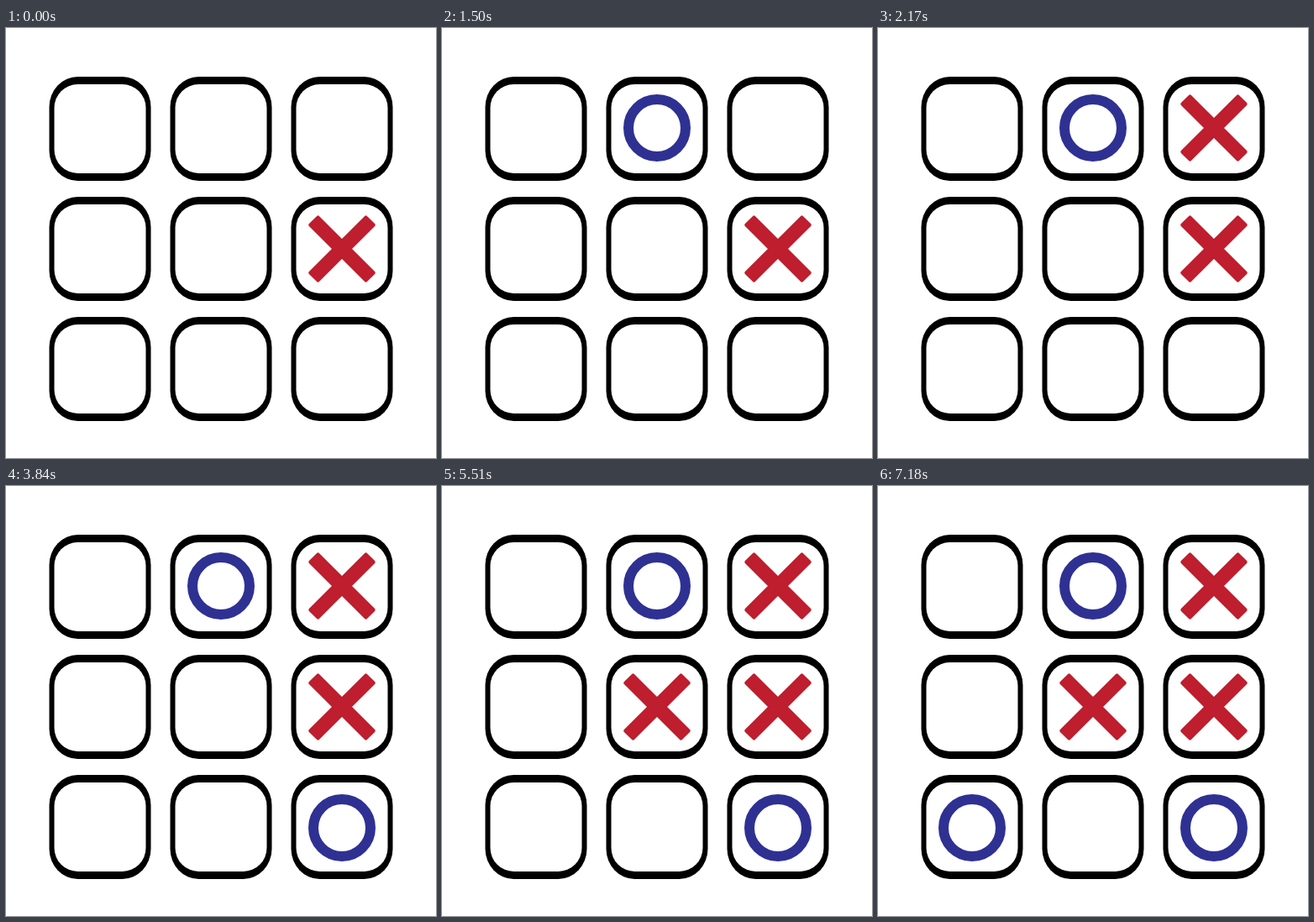
Write an HTML page that moves like this. It is 512 by 512 pixels and loops after 8 s.

```html
<!DOCTYPE html>
<html lang="en">
<head>
<meta charset="utf-8">
<title>Noughts and crosses</title>
<style>
  html, body { margin: 0; width: 100%; height: 100%; overflow: hidden; background: #fff; }
  svg { display: block; width: 100%; height: 100%; }
</style>
</head>
<body>
<svg viewBox="0 0 512 512">
  <defs>
    <g id="cell">
      <rect x="-60.5" y="-62" width="121" height="124" rx="34" ry="36"/>
      <rect x="-54.5" y="-53" width="109" height="106" rx="28" ry="28" fill="#fff"/>
    </g>
    <g id="cross" fill="#be1e2d">
      <rect x="-48.8" y="-8.5" width="97.6" height="17" rx="2" transform="rotate(45)"/>
      <rect x="-48.8" y="-8.5" width="97.6" height="17" rx="2" transform="rotate(-45)"/>
    </g>
    <circle id="nought" r="34" fill="none" stroke="#2e3192" stroke-width="12"/>
  </defs>
  <g id="board"></g>
  <g id="marks"></g>
</svg>
<script>
  const LOOP = 8000;
  const MOVES = [
    { at: 0, mark: "cross", col: 2, row: 1 },
    { at: 500, mark: "nought", col: 1, row: 0 },
    { at: 2170, mark: "cross", col: 2, row: 0 },
    { at: 3840, mark: "nought", col: 2, row: 2 },
    { at: 5510, mark: "cross", col: 1, row: 1 },
    { at: 7180, mark: "nought", col: 0, row: 2 }
  ];

  function place(parent, id, x, y) {
    const use = document.createElementNS("http://www.w3.org/2000/svg", "use");
    use.setAttribute("href", "#" + id);
    use.setAttribute("x", x);
    use.setAttribute("y", y);
    return document.getElementById(parent).appendChild(use);
  }

  for (let i = 0; i < 9; i++) {
    place("board", "cell", 112 + 144 * (i % 3), 120 + 143 * Math.floor(i / 3));
  }
  for (const move of MOVES) {
    move.node = place("marks", move.mark, 112 + 144 * move.col, 119 + 144 * move.row);
  }

  function draw(time) {
    for (const move of MOVES) {
      move.node.style.display = time >= move.at ? "" : "none";
    }
  }

  const start = performance.now();
  function tick() {
    draw((performance.now() - start) % LOOP);
    requestAnimationFrame(tick);
  }
  tick();
</script>
</body>
</html>
```
